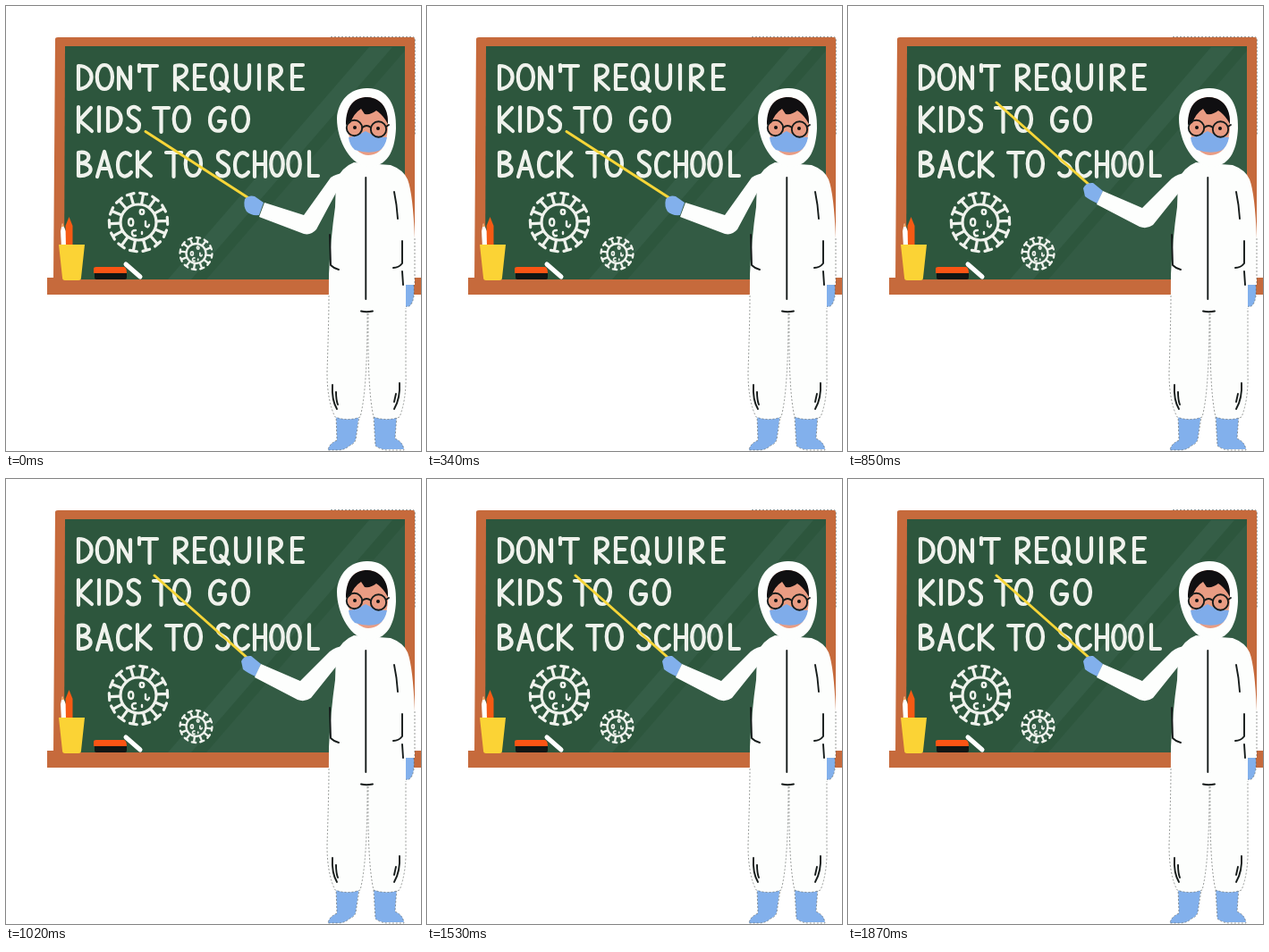
An HTML page for the animation above (2.04 s loop, 464x498 px).

```html
<!DOCTYPE html>
<html lang="en">
<head>
<meta charset="utf-8">
<title>Chalkboard lesson</title>
<style>
  html, body { margin: 0; width: 100%; height: 100%; overflow: hidden; background: #fff; }
  svg { display: block; width: 100vw; height: 100vh; }
  .chalk { fill: none; stroke: #eff2ec; stroke-width: 4.2; stroke-linecap: round; stroke-linejoin: round; }
  .ink { fill: none; stroke: #151b1a; stroke-width: 1.9; stroke-linecap: round; stroke-linejoin: round; }
  .edge { fill: none; stroke: #555a57; stroke-width: .6; stroke-dasharray: 2 2; }
  .suit { fill: #fdfefd; }
  .glove { fill: #82b0ec; }
  .stick { stroke: #f6d538; stroke-width: 3; stroke-linecap: round; }
</style>
</head>
<body>
<svg viewBox="0 0 464 498" preserveAspectRatio="none">
  <g id="board">
    <path fill="#c66a3c" d="M55 37Q55 35 58 35H455Q457 35 457 38V306H53Z"/>
    <rect x="46" y="304" width="418" height="19" fill="#c66a3c"/>
    <path fill="#2d563d" d="M66 45H446V306H65Z"/>
    <path fill="#355e47" d="M181 306H207L432 46H406Z"/>
    <path fill="#335b44" d="M224 306H446V50Z"/>
    <path class="edge" d="M363 34.5H455Q457.5 35 457.5 39V145"/>
  </g>

  <g id="words" class="chalk" role="img" aria-label="Don't require kids to go back to school"></g>
  <g id="germs" class="chalk"></g>

  <g id="shelf">
    <path fill="#fff" d="M61 252L63 243L67 252L68 270H62Z"/>
    <path fill="#f2a45b" d="M62 247L63 243L65 247Z"/>
    <path fill="#f55a14" d="M66.500 246L70.500 236L74.500 246V270H67Z"/>
    <path fill="#fbd335" d="M59 267H88L84 304Q84 307 81 307H66Q63 307 63 304Z"/>
    <path fill="#111614" d="M99 298H135V304Q135 306 133 306H101Q99 306 99 304Z"/>
    <path fill="#fb5414" d="M98 294Q98 292 101 292H132Q135 293 135 299H98Z"/>
    <path stroke="#fff" stroke-width="5" stroke-linecap="round" d="M134 289L150 303"/>
  </g>

  <g id="person">
    <path class="glove" d="M445 311H456Q457 326 454 332Q451 338 446 336Z"/>
    <path class="glove" d="M369 455H395L391 485Q389 490 384 492Q379 497 371 497H360Q361 490 370 486Z"/>
    <path class="glove" d="M411 455H437L435 484Q444 488 445 496H427Q419 497 413 492Z"/>
    <path class="edge" d="M369 458L370 486Q361 490 360 497H371Q379 497 384 492Q390 490 391 485L395 460M411 460L413 492Q419 497 427 497H445Q444 488 435 484L437 458M456 312Q457 326 454 332Q451 338 447 336"/>
    <path class="suit" d="M389 175Q376 180 369 195L368 225Q363 260 361 300Q361 350 359 410Q359 442 368 460Q382 465 396 460Q404 430 404 344H405Q404 430 411 460Q426 465 440 460Q448 440 447 410L447 312H457L457 260Q455 210 449 194Q444 183 430 178Z"/>
    <path class="edge" d="M361 324Q361 350 359 410Q359 442 368 460Q382 465 396 460Q404 430 404 344M405 344Q404 430 411 460Q426 465 440 460Q448 440 447 410V338M457 260V312"/>
    <path class="suit" d="M403 92C427 91 437 112 436 137C435 158 429 178 408 180C386 181 370 151 370 126C371 106 385 92 403 92Z"/>
    <g id="face">
      <path fill="#e99c83" d="M381 125C382 110 391 102 404 102C421 103 428 117 427 136C426 153 420 167 405 167C390 166 381 149 381 125Z"/>
      <path fill="#100f11" d="M380 133C380 111 390 102 404 102C421 103 428 117 427 132L424 127Q419 120 414 117Q408 122 401 121Q399 118 397 115Q389 120 385 131Z"/>
      <path fill="#7facea" d="M383 147Q392 146 402 140Q413 147 426 147Q424 158 417 162Q405 166 390 161Q384 156 383 147Z"/>
      <g class="ink">
        <circle cx="389.500" cy="136.500" r="8.700"/>
        <circle cx="416.500" cy="138" r="8.700"/>
        <path d="M398.500 136Q403 132 408 136M425 135L428 133"/>
      </g>
      <circle cx="390" cy="136" r="2" fill="#111"/>
      <circle cx="416" cy="137" r="2" fill="#111"/>
    </g>
    <g class="ink">
      <path d="M402.300 192V328M397 341.500Q403 343 410 341.500"/>
      <path d="M434 208Q437 222 438 238M362 256L363 290Q367 294 372 295M443 263V288Q439 293 433 293M443 297L444 312"/>
      <path d="M365 424Q364 441 370 451M369 432Q369 441 371 446M440 422Q441 439 434 451M436 434L434 443"/>
    </g>
  </g>

  <g id="low">
    <path class="stick" d="M156 140.500L276 218"/>
    <path class="glove" d="M267 216Q272 211 278 213L288 220L283 234Q274 235 269 230Q265 224 267 216Z"/>
    <path class="suit" d="M289 220L333 234L363 192Q375 184 383 190L369 209L347 250Q341 257 333 255L283 236Z"/>
  </g>
  <g id="high">
    <path class="stick" d="M166 108L273 203"/>
    <path class="glove" d="M263 204Q266 197 274 198L285 207L279 221Q270 217 265 213Z"/>
    <path class="suit" d="M285 207L329 226L362 193Q375 184 383 190L369 210L341 245Q334 250 326 247L278 222Z"/>
  </g>
</svg>
<script>
  const NS = 'http://www.w3.org/2000/svg';
  const LOOP = 2040, SWITCH = 510 / LOOP;
  const $ = id => document.getElementById(id);

  function add(parent, d, move, width) {
    const p = document.createElementNS(NS, 'path');
    p.setAttribute('d', d);
    p.setAttribute('transform', move);
    if (width) p.style.strokeWidth = width;
    parent.append(p);
  }

  // Single-stroke hand lettering, 28 units tall; "o" is a narrow capital
  const pen = {
    A: 'M1 28L9 0L17 28M4 19H14',
    B: 'M2 1V27M2 1C17 -2 17 13 3 13C20 12 20 28 2 27',
    C: 'M15 4C8 -3 1 5 1 15C1 28 10 31 16 23',
    D: 'M2 1V27C22 25 21 1 2 1',
    E: 'M14 0H2V27H14M2 13H12',
    G: 'M17 4C10 -4 1 4 1 15C1 30 18 31 18 16H11',
    H: 'M2 0V28M14 0V28M2 14H14',
    I: 'M2 0V27',
    K: 'M2 0V28M16 1L3 15L17 27',
    L: 'M2 0V27H12',
    N: 'M2 27V3L15 26V2',
    O: 'M9 0C-2 0 -2 27 9 27C21 27 21 0 9 0Z',
    o: 'M8 1C-1 1 -1 27 8 27C17 27 17 1 8 1Z',
    Q: 'M9 0C-2 0 -2 27 9 27C21 27 21 0 9 0ZM11 20L20 29',
    R: 'M2 28V1C19 -3 19 14 3 15L16 27',
    S: 'M14 3C8 -3 1 1 2 7C3 13 14 13 14 20C14 29 4 29 1 24',
    T: 'M1 1H18M9.500 1V28',
    U: 'M1 0V17C1 30 16 30 16 17V0',
    "'": 'M2 0V7'
  };
  const lines = [
    [66, "DON'TREQUIRE", [79, 101, 124, 147, 151, 187, 209, 229, 256, 281, 293, 318]],
    [113, 'KIDSTOGO', [79, 102, 112, 135, 164, 187, 227, 253]],
    [163, 'BACKTOSCHooL', [79, 101, 124, 145, 178, 200, 235, 255, 276, 295, 314, 337]]
  ];
  for (const [y, text, xs] of lines)
    [...text].forEach((c, i) => add($('words'), pen[c], `translate(${xs[i]} ${y})`));

  function germ(x, y, scale, spikes, turn, w) {
    const at = `translate(${x} ${y}) scale(${scale})`;
    add($('germs'), 'M0 -20A20 20 0 1 1 0 20A20 20 0 1 1 0 -20', at, w);
    for (let i = 0; i < spikes; i++)
      add($('germs'), 'M0 -21V-31M-4 -32.500L4 -32.500', `${at} rotate(${turn + i * 360 / spikes})`, w);
    add($('germs'), 'M4 -14C1 -15 1 -9 4 -9C7 -9 7 -14 4 -14M-8 -4C-12 -4 -12 4 -8 4C-5 4 -5 -4 -8 -4M8 -1V4Q11 7 12 3M-3 9Q-8 9 -7 13Q-6 16 -3 15M4 11V13', at, w * .75);
  }
  germ(148, 242, 1, 14, 10, 3.2);
  germ(212.500, 277, .55, 12, 8, 4.2);

  function hold(id, before, after) {
    $(id).animate([
      { opacity: before, offset: 0, easing: 'steps(1, end)' },
      { opacity: after, offset: SWITCH, easing: 'steps(1, end)' },
      { opacity: after, offset: 1 }
    ], { duration: LOOP, iterations: Infinity });
  }
  hold('low', 1, 0);
  hold('high', 0, 1);
</script>
</body>
</html>
```
